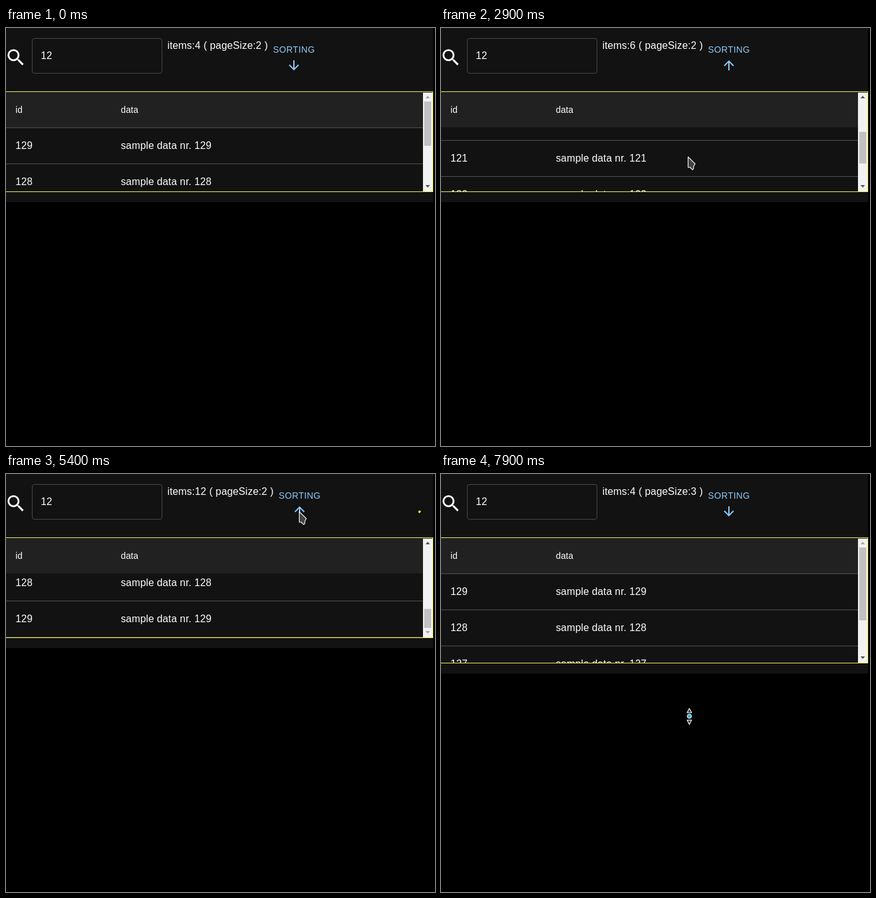
Animation of 678 by 660 pixels, one loop 8 s. Source, as an HTML page:

```html
<!DOCTYPE html>
<html lang="en">
<head>
<meta charset="utf-8">
<title>Sortable table</title>
<style>
  html, body { margin: 0; width: 100%; height: 100%; overflow: hidden; background: #000; }
  body { position: relative; color: #fff; font: 16px/24px "Liberation Sans", Arial, sans-serif; letter-spacing: .15px; }
  body > * { position: absolute; box-sizing: border-box; }
  svg { display: block; overflow: visible; }
  #panel { left: 0; top: 0; width: 675px; background: #121212; }
  #search { left: -2px; top: 29px; }
  #input { left: 41px; top: 16px; width: 206px; height: 56px; border: 1px solid #484848; border-radius: 4px;
    padding-left: 13px; line-height: 54px; }
  #tools { left: 255px; top: 16px; display: flex; white-space: pre; }
  #sort { padding: 6px 8px; font-size: 14px; line-height: 24.5px; letter-spacing: .4px; color: #90caf9; }
  #sort svg { margin: 0 auto; fill: currentColor; }
  #frame { left: -2px; top: 100px; width: 677px; border: 1px solid #f0f250; display: flex; }
  #scroller { width: 660px; height: 100%; overflow: hidden; }
  #bar { width: 15px; }
  table { width: 100%; border-spacing: 0; border-bottom: 1px solid #515151; }
  th, td { padding: 16px; text-align: left; }
  th { position: sticky; top: 0; z-index: 1; background: #212121; font-size: 14px; font-weight: 500; }
  td { border-top: 1px solid #515151; }
  #overlay { left: 0; top: 0; }
  .pointer { fill: #424346; stroke: #fff; stroke-width: 1.1; stroke-linejoin: round; }
</style>
</head>
<body>
<div id="panel"></div>
<svg id="search" width="35" height="35" viewBox="0 0 24 24" fill="#fff"><path d="M15.5 14h-.79l-.28-.27A6.47 6.47 0 0 0 16 9.5 6.5 6.5 0 1 0 9.5 16c1.61 0 3.09-.59 4.23-1.57l.27.28v.79l5 4.99L20.49 19zm-6 0C7.01 14 5 11.99 5 9.5S7.01 5 9.5 5 14 7.01 14 9.5 11.99 14 9.5 14z"/></svg>
<div id="input">12</div>
<div id="tools">
  <div id="info"></div>
  <div id="sort">SORTING<svg width="24" height="24"><path id="arrow" d="M20 12l-1.41-1.41L13 16.17V4h-2v12.17l-5.58-5.59L4 12l8 8z"/></svg></div>
</div>
<div id="frame">
  <div id="scroller"><table>
    <thead><tr><th>id</th><th>data</th></tr></thead>
    <tbody id="rows"></tbody>
  </table></div>
  <svg id="bar">
    <rect y="1" width="15" height="100%" fill="#f1f1f1" clip-path="inset(0 0 1px 0)"/>
    <rect id="thumb" x="2" width="11" fill="#c1c1c1"/>
    <path id="up" d="M4 10h7l-3.5-4z"/>
    <path id="down" d="M4-10h7l-3.5 4z"/>
  </svg>
</div>
<svg id="overlay" width="678" height="660">
  <circle id="spinner" cx="639.5" cy="48" r="18.2" pathLength="127" fill="none" stroke="#eef022" stroke-width="3.3"/>
  <path id="pointer" class="pointer" d="M.5 .5V17H3.5L7.5 20.8L9.2 19.2V15.5L11.7 11.3Z"/>
  <g id="resizer" class="pointer">
    <path d="M0-12.5L3.6-5.5H-3.6ZM0 13L3.6 6H-3.6Z"/>
    <circle r="3.3" fill="#3daee9"/>
  </g>
</svg>
<script>
const $ = id => document.getElementById(id);
const set = (el, attrs) => { for (const k in attrs) el.setAttribute(k, attrs[k]); };
const show = (el, on) => { el.style.display = on ? '' : 'none'; };
const clamp = (x, lo, hi) => Math.min(hi, Math.max(lo, x));
const ease = x => x * x * (3 - 2 * x);

const LOOP = 8000, STEP = 100, ROW = 57, VIEW = 157;
const ASC = [12, 112, ...Array.from({ length: 10 }, (_, i) => 120 + i)];
const DESC = [...ASC].reverse();
const CLICKS = [800, 5400], SWAP = 100, LOAD_TIME = 400, RESIZE = 7300;

// Stops of the pointer: time, x, y
const STOPS = [[200, 486, 226], [700, 455, 60], [2100, 386, 202], [2900, 390, 203], [3600, 390, 203],
  [4700, 401, 182], [5400, 463, 59], [6000, 412, 250], [7700, 405, 280], [7900, 392.5, 382.5]];

// Scrolling starts slowly and speeds up
const WHEEL = 2045, SPEED = .1504, GAIN = 3.07e-5;
const scrollAt = t => { const x = Math.max(0, t - WHEEL); return SPEED * x + GAIN * x * x; };
const timeAt = s => WHEEL + (Math.sqrt(SPEED * SPEED + 4 * GAIN * s) - SPEED) / (2 * GAIN);
const maxScroll = count => ROW * (count + 1) - VIEW;

const rows = ASC.map(() => {
  const tr = $('rows').insertRow();
  return { tr, id: tr.insertCell(), data: tr.insertCell() };
});

function state(t) {
  const asc = t >= CLICKS[0] + SWAP && t < CLICKS[1] + SWAP;
  const scroll = asc ? scrollAt(t) : 0;
  const pages = Math.max(0, Math.ceil((scroll - maxScroll(2)) / (2 * ROW)));
  const count = asc ? Math.min(12, 2 + 2 * pages) : 4;

  // A load runs after a click, or when the end of the list comes near
  let loadStart = CLICKS.find(c => t >= c && t < c + LOAD_TIME);
  const trigger = maxScroll(count) - 88;
  if (pages && count < 12 && scroll > trigger) loadStart = timeAt(trigger);

  return { asc, scroll, count, loadStart, grow: 20 * clamp((t - 7700) / 100, 0, 2) };
}

function drawSpinner(t, loadStart) {
  show($('spinner'), loadStart !== undefined);
  if (loadStart === undefined) return;
  const p = (t - loadStart + 75) / 1400 % 1;
  const head = ease(Math.min(1, p * 2)), tail = ease(Math.max(0, p * 2 - 1));
  set($('spinner'), {
    'stroke-dasharray': `${1 + 99 * head} 200`,
    'stroke-dashoffset': -(15 * head + 110 * tail),
    transform: `rotate(${360 * p + 13} 639.5 48)`
  });
}

function drawTable({ asc, scroll, count, grow }) {
  const list = asc ? ASC : DESC;
  rows.forEach(({ tr, id, data }, i) => {
    show(tr, i < count);
    id.textContent = list[i];
    data.textContent = 'sample data nr. ' + list[i];
  });
  const view = VIEW + grow, track = view - 30;
  $('panel').style.height = 275 + grow + 'px';
  $('frame').style.height = view + 2 + 'px';
  $('bar').style.height = view + 'px';

  const max = maxScroll(count) - grow, top = Math.min(max, Math.round(scroll));
  $('scroller').scrollTop = top;
  const size = Math.max(30, Math.round(view / (max + view) * track));
  set($('thumb'), { y: Math.round(15 + top / max * (track - size)), height: size });
  set($('up'), { fill: top > 0 ? '#505050' : '#a3a3a3' });
  set($('down'), { fill: top < max ? '#505050' : '#a3a3a3', transform: `translate(0 ${view})` });
}

function drawPointer(t) {
  const n = clamp(STOPS.findIndex(s => s[0] > t), 1, STOPS.length - 1);
  const i = t >= STOPS[STOPS.length - 1][0] ? STOPS.length - 1 : n;
  const [a, b] = [STOPS[i - 1], STOPS[i]];
  const p = ease(clamp((t - a[0]) / (b[0] - a[0]), 0, 1));
  const transform = `translate(${a[1] + (b[1] - a[1]) * p} ${a[2] + (b[2] - a[2]) * p})`;
  set($('pointer'), { transform });
  set($('resizer'), { transform });
  show($('pointer'), t >= STOPS[0][0] && t < RESIZE);
  show($('resizer'), t >= RESIZE);
}

function draw(t) {
  const now = state(t);
  $('info').textContent = `items:${now.count} ( pageSize:${now.grow === 40 ? 3 : 2} )`;
  set($('arrow'), { transform: now.asc ? 'rotate(180 12 12)' : '' });
  drawSpinner(t, now.loadStart);
  drawTable(now);
  drawPointer(t);
}

const start = performance.now();
function tick() {
  const t = (performance.now() - start) % LOOP;
  draw(Math.floor(t / STEP) * STEP);
  requestAnimationFrame(tick);
}
tick();
</script>
</body>
</html>
```
